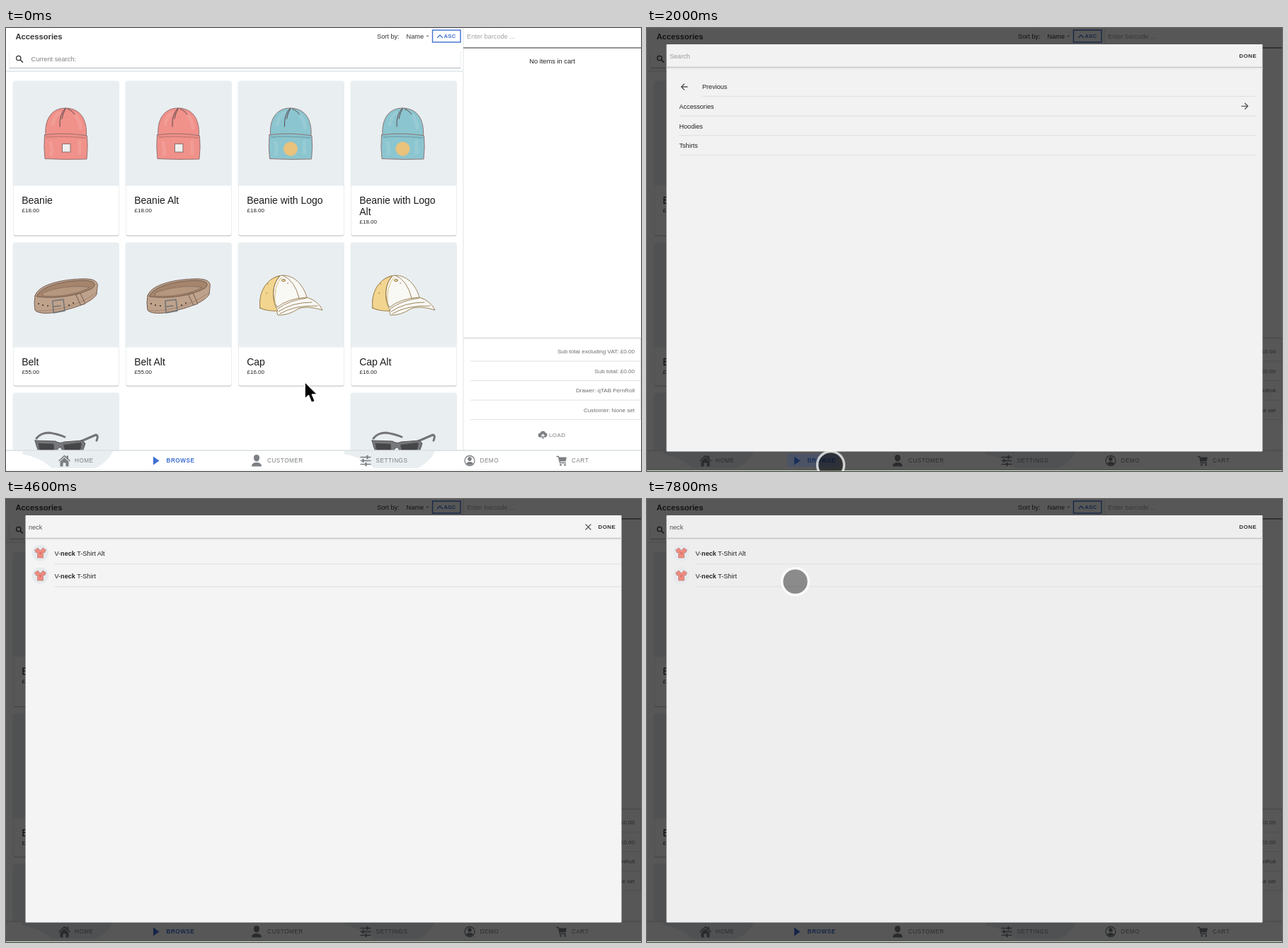
Write an HTML page that moves like this. It is 897 px wide and 625 px high and loops after 8000 ms.

```html
<!DOCTYPE html>
<html lang="en">
<head>
<meta charset="utf-8">
<title>Shop till search</title>
<style>
html, body { margin: 0; width: 100%; height: 100%; overflow: hidden; background: #fff; }
svg { display: block; width: 897px; height: 625px; font-family: "Liberation Sans", Arial, sans-serif; }
text { white-space: pre; }
.pane { fill: #e9eef1; }
.entering .pane { fill: #fff; }
.entering :is(.rule, #field, #rim) { visibility: hidden; }
.entering .far { opacity: .55; }
.ln { fill: none; stroke-linecap: round; stroke-linejoin: round; }
</style>
</head>
<body>
<svg id="stage" viewBox="0 0 897 625">
<defs>
  <g id="beanie" class="ln">
    <path stroke="#8a6a6a" stroke-width=".9" d="M56 152C54 128 65 113 84 113C104 113 115 128 113.500 152Z" style="fill:var(--c)"/>
    <path stroke="#8a6a6a" stroke-width=".9" d="M54.500 151C72 148 98 149 114.500 152Q116 168 114 185Q84 186 55 184.500Q53 168 54.500 151Z" style="fill:var(--c)"/>
    <path stroke="#fff" stroke-opacity=".1" stroke-width="5" d="M66 136Q68 125 75 120M98 123Q104 130 105 141M63 162Q66 172 64 178M104 160V176"/>
    <path stroke="#5c4a4e" stroke-width="1" d="M84 113Q75 122 76 139M84 114Q80 121 79 128M87 114Q94 117 97 122"/>
    <path stroke="#000" stroke-opacity=".14" stroke-width="1.800" d="M57 154Q84 152 112 155"/>
  </g>
  <g id="belt" class="ln" stroke="#6a564a" stroke-width=".9">
    <path fill="#bfa28b" d="M41 378C45 363 75 355 106 354C125 353 131 358 129 366L128 376C120 388 95 396 70 401C56 404 43 402 41 398Q39 388 41 378Z"/>
    <path fill="#a4846c" d="M44 377C52 363 82 357 108 356C124 356 129 361 122 367C106 376 76 383 44 379Z"/>
    <path fill="#b5967e" stroke-opacity=".5" d="M52 374C64 368 92 362 118 366C104 374 78 380 52 378Z"/>
    <path fill="#bfa28b" d="M99 376L105 374L112 389L106 391Z"/>
    <path stroke="#70757a" stroke-width="1.600" d="M66 385L81 383L83 399L67 402ZM67 393L77 392"/>
    <path stroke="#4b3c34" stroke-width="2.200" d="M46 389h.1M52 391h.1M59 392h.1M89 391h.1M95 388h.1"/>
    <path stroke-opacity=".4" d="M43 399Q90 400 127 374"/>
  </g>
  <g id="cap" class="ln" stroke="#94794a" stroke-width=".9">
    <path fill="#f8f8f5" d="M359 395C356 371 371 350 391 349C410 349 421 366 425 380Q441 385 447 398Q425 391 413 396Q398 406 384 405Q382 396 378 396Q368 400 359 395Z"/>
    <path fill="#f2d58f" d="M359 395C356 371 370 352 387 350C376 360 374 384 384 399Q369 400 359 395Z"/>
    <path d="M387 350C376 360 375 381 383 394Q397 382 424 380M391 349Q408 356 414 381M384 396Q400 384 425 381M385 400Q404 387 432 387M387 403Q407 391 440 392"/>
    <path stroke="#d8b86a" d="M389 352Q378 364 380 389"/>
    <ellipse cx="392" cy="356" rx="2.500" ry="1.700" fill="#e8cf92"/>
    <path stroke-width="1.600" d="M370 361h.1M398 360h.1M368 374h.1"/>
  </g>
  <g id="shades" class="ln" stroke="#505153">
    <path stroke-width="3" stroke="#737477" d="M43 579Q49 571 61 571Q74 573 83 577M106 583L127 574Q131 575 128 582"/>
    <path stroke-width="1" fill="#77787b" d="M41 582L70 583Q76 587 82 584L108 582L112 586Q109 596 106 601H82L78 592Q73 590 70 601H48Q43 592 41 582Z"/>
    <path stroke-width="1" fill="#454648" d="M46 586L67 587Q69 593 66 601H51Q46 594 46 586ZM82 588L106 585Q107 593 101 601H86Q81 594 82 588Z"/>
  </g>
  <g id="shirt">
    <path fill="#ee8b80" stroke="#a8655f" stroke-width=".5" d="M-3.500 -7L0 -3L3.500 -7L8 -4L6 0L4 -1V7H-4V-1L-6 0L-8 -4Z"/>
    <path fill="#d96f66" d="M-1.200 -1h2.400v3h-2.400z"/>
  </g>
</defs>
<g id="page"></g>
<rect id="dim" width="897" height="625"/>
<rect id="press" x="198" y="601" width="73" height="18.500" fill="#2a4a90" opacity=".25"/>
<rect id="edge" y="624" width="897" height="1" fill="#cfe3c8"/>
<g id="modal"></g>
<g id="pointer">
  <path id="arrow" d="M0 0V24.500L5.500 19.500L9.500 29.500L14.500 27.500L10.500 18H18Z" fill="#000" stroke="#fff" stroke-width="1.700" stroke-linejoin="round"/>
  <g id="ring">
    <circle r="17.300" fill="#000" fill-opacity=".42"/>
    <circle id="rim" r="19" fill="none" stroke="#fff" stroke-opacity=".72" stroke-width="3.400"/>
  </g>
</g>
</svg>
<script>
const $ = id => document.getElementById(id);
// y is the vertical middle of the capitals
const text = (x, y, s, size = 9.2, fill = '#333', more = '') =>
  `<text x="${x}" y="${y + size * .36}" font-size="${size}" fill="${fill}" ${more}>${s}</text>`;
const line = (x1, x2, y, color = '#dcdfe1', w = 1, cls = 'rule') =>
  `<path class="${cls}" d="M${x1} ${y}H${x2}" stroke="${color}" stroke-width="${w}"/>`;
const ink = (d, color, w = 1.3) => `<path class="ln" d="${d}" stroke="${color}" stroke-width="${w}"/>`;
const shape = (d, color) => `<path d="${d}" fill="${color}"/>`;
const END = 'text-anchor="end"', BOLD = 'font-weight="700"';
const RED = '#f0918a', TEAL = '#8bc5cf', GREY = '#7c7f83', BLUE = '#3f71d2';
const COLS = [9.5, 168.5, 327.5, 486.5];

function card(col, top, height, title, price, art, artX, color) {
  const x = COLS[col], lines = title.split('|');
  let s = `<rect x="${x + 1.2}" y="${top + 4}" width="148.600" height="${height - 2.800}" rx="2.500" fill="#c3c7c9"/>
    <rect x="${x + 1.5}" y="${top + 3}" width="148" height="${height - 3}" rx="2" fill="#fff"/>
    <path class="pane" d="M${x} ${top + 148}V${top + 4}q0 -4 4 -4h142.500q4 0 4 4V${top + 148}z"/>
    <use href="#${art}" x="${artX}" style="--c:${color}"/>`;
  lines.forEach((l, i) => s += text(x + 12.7, top + 168.5 + i * 16, l, 14, '#1b1b1b'));
  if (price) s += text(x + 13, top + 183 + (lines.length - 1) * 16, price, 8, '#222');
  return s;
}

function cards() {
  let s = '';
  ['Beanie', 'Beanie Alt', 'Beanie with Logo', 'Beanie with Logo|Alt'].forEach((title, i) => {
    const dx = [0, 159, 317.5, 476][i];
    s += card(i, 74.5, 218, title, '£18.00', 'beanie', dx, i < 2 ? RED : TEAL);
    s += i < 2
      ? `<rect x="${79.5 + dx}" y="163.500" width="11.500" height="11.500" fill="#f0efed" stroke="#85706f"/>`
      : `<circle cx="${84.5 + dx}" cy="170.500" r="10" fill="#e9c27c"/>`;
  });
  s += card(0, 302.5, 202, 'Belt', '£55.00', 'belt', 0) + card(1, 302.5, 202, 'Belt Alt', '£55.00', 'belt', 159)
    + card(2, 302.5, 202, 'Cap', '£16.00', 'cap', 0) + card(3, 302.5, 202, 'Cap Alt', '£16.00', 'cap', 159);
  return s + card(0, 514.5, 200, '', '', 'shades', 0) + card(3, 514.5, 200, '', '', 'shades', 476);
}

function header() {
  return text(13.5, 12, 'Accessories', 11.2, '#363636', BOLD)
    + text(524, 11.5, 'Sort by:') + text(565.5, 11.5, 'Name') + shape('M593 10.500h5l-2.500 2.500z', '#999')
    + `<rect x="602.500" y="3" width="39.500" height="17" fill="#fff" stroke="${BLUE}" stroke-width="1.400"/>`
    + ink('M609.500 13.500L613 10L616.500 13.500', BLUE) + text(618.5, 11.7, 'ASC', 7.7, BLUE, BOLD + ' letter-spacing=".3"')
    + line(4.5, 642.5, 56.3, '#c6c9cb', 1.3, '') + line(5, 642, 57.6, '#eceeef', 1, '')
    + ink('M4.500 34V56M642.500 34V56', '#eceeef', 1)
    + line(0, 645, 61, '#dde5e8', 1.5, '')
    + `<circle cx="17.800" cy="42.500" r="3.200" fill="none" stroke="#333" stroke-width="1.300"/>`
    + ink('M20.300 45L23.500 48.200', '#333', 1.5) + text(35.5, 44, 'Current search:', 9.2, '#808080');
}

function cart() {
  let s = ink('M646 0V596', '#e1e3e4', 1) + text(651, 12, 'Enter barcode ...', 9.2, '#a3a3a3')
    + line(646, 897, 28, '#6e7173', 1.5, '') + text(771.5, 46.5, 'No items in cart', 9.3, '#222', 'text-anchor="middle"')
    + line(646, 897, 437.5, '#d5dadd', 1.5, '') + ink('M896.500 438V552', '#e3e6e8', 1);
  ['Sub total excluding VAT: £0.00', 'Sub total: £0.00', 'Drawer: qTAB FernRoll', 'Customer: None set'].forEach((row, i) => {
    s += text(888, 456 + i * 27.6, row, 8.1, '#6c6c6c', END) + line(656, 897, 470 + i * 27.5, '#dfe2e4', 1, '');
  });
  return s + shape('M755 577.500a3 3 0 0 1 -.5 -6a4 4 0 0 1 7.500 -.5a3.300 3.300 0 0 1 -.2 6.500h-1.800v-2h1.500l-3 -3l-3 3h1.500v2zM757.500 575.500h2v4h-2z', GREY)
    + text(767, 574, 'LOAD', 8, GREY, 'letter-spacing=".4"');
}

function nav() {
  const label = (x, s, color = GREY, more = '') => text(x, 610.5, s, 8.2, color, 'letter-spacing=".5" ' + more);
  // cards tint the bar slightly where they pass below it
  const tint = x => `<path class="pane" d="M${x} 597H${x + 128}Q${x + 122} 611 ${x + 104} 621H${x + 42}Q${x + 26} 606 ${x} 601Z"/>`;
  return `<rect y="596" width="897" height="29" fill="#fff"/>` + tint(23) + tint(478)
    + line(0, 897, 596, '#d9dee1', 1.3, '') + line(0, 897, 623.5, '#eef0f0', 1, '')
    + shape('M74 610.500L82.500 602.500L85.500 605.300V603.500H88V607.600L91 610.500L90 611.600L82.500 604.800L75 611.600ZM76.500 611.500L82.500 606L88.500 611.500V618.500H84.500V613.500H80.500V618.500H76.500Z', GREY)
    + label(97, 'HOME')
    + shape('M208 604.500L216.500 610.500L208 616.500Z', BLUE) + label(226.5, 'BROWSE', BLUE, BOLD)
    + shape('M350 606a4 4 0 0 1 8 0v1a4 4.500 0 0 1 -8 0zM347 618.500q0 -5.500 7 -5.500t7 5.500z', GREY) + label(369, 'CUSTOMER')
    + ink('M501 605.500H515M501 610.500H515M501 615.500H515', GREY, 1.3)
    + ink('M510.500 604V607M504.500 609V612M508.500 614V617', GREY, 2.4) + label(522.5, 'SETTINGS')
    + `<circle cx="655" cy="610.500" r="7" fill="none" stroke="${GREY}" stroke-width="1.300"/>`
    + shape('M652.200 608a2.800 2.800 0 1 1 5.600 0a2.800 3 0 0 1 -5.600 0zM650 615q1 -3 5 -3t5 3q-5 3.500 -10 0z', GREY) + label(669.5, 'DEMO')
    + ink('M778 604.500H780.500L782.500 613.500H790.500', GREY) + shape('M780.500 605.500H792L790.500 611.500H782z', GREY)
    + ink('M783.500 616.400h.1M789.500 616.400h.1', GREY, 2.6) + label(799, 'CART');
}

function dialog() {
  const dark = '#222';
  let list = ink('M57 83H49M52.500 79L48.500 83L52.500 87', '#555') + text(78, 83, 'Previous', 9.1, dark) + line(78, 860, 96.3)
    + `<g class="far">${ink('M840 110.300H848.500M844.800 106.300L848.800 110.300L844.800 114.300', '#555')}</g>`;
  ['Accessories', 'Hoodies', 'Tshirts'].forEach((s, i) =>
    list += text(45.5, 111 + i * 27.5, s, 9.1, dark) + line(45.5, 860, 124.2 + i * 27.5));
  let found = '';
  [' Alt', ''].forEach((s, i) => {
    const y = 76 + i * 32;
    found += `<circle cx="48.500" cy="${y}" r="11.600" fill="#e6eaed"/><use href="#shirt" x="48.500" y="${y}"/>`
      + text(68.5, y + .8, `V-<tspan ${BOLD}>neck</tspan> T-Shirt${s}`, 9.1, dark) + line(68.5, 869, y + 15.8);
  });
  return `<rect id="sheet" x="27.500" y="23" width="842" height="574.500" rx="1"/>`
    + line(27.5, 869.5, 55.5, '#c3c3c3', 1.5) + line(27.5, 869.5, 57, '#e6e6e6')
    + text(32, 39.5, '', 9.1, '#999', 'id="field"')
    + `<path id="caret" d="M52 34.500V44.500" stroke="#444"/>`
    + `<g id="clear">${ink('M819 36L826 43M826 36L819 43', '#555', 1.2)}</g>`
    + text(836.5, 39.5, 'DONE', 7.9, '#333', BOLD + ' letter-spacing=".5" class="far"')
    + `<g id="list">${list}</g><g id="found">${found}</g>`;
}

$('page').innerHTML = cards() + header() + cart() + nav();
$('modal').innerHTML = dialog();

const LOOP = 8000, STEP = 200;
const PATH = [[0, 422, 499], [200, 410, 530], [400, 410, 530], [1200, 259, 616], [2000, 259.5, 616.5], [2800, 302, 40],
  [3000, 306, 6], [3400, 295.5, 56.5], [6400, 293, 56], [7400, 209.5, 116.5], [8000, 209.5, 116.5]];
const TYPED = [[0, ''], [4200, 'n'], [4400, 'nec'], [4600, 'neck']];
const CARET = [[0, 0], [4000, 1], [4600, 0], [5200, 1], [5600, 0], [6000, 1], [6600, 0], [7000, 1], [7400, 0]];
const SHEET = [[0, '#d2d4d5'], [2000, '#f2f2f2'], [2200, '#f4f4f4'], [7800, '#eee']];

const held = (table, t) => table.findLast(k => k[0] <= t)[1];
const during = (t, a, b) => t >= a && t < b;
const show = (id, on) => $(id).style.display = on ? '' : 'none';

function place(t) {
  const i = PATH.findIndex(k => k[0] > t);
  const [t0, x0, y0] = PATH[i - 1], [t1, x1, y1] = PATH[i];
  const p = (t - t0) / (t1 - t0);
  return [x0 + (x1 - x0) * p, y0 + (y1 - y0) * p];
}

function draw(time) {
  const t = Math.floor(time % LOOP / STEP) * STEP;
  const open = t >= 1800, entering = during(t, 1800, 2000);
  const typed = held(TYPED, t);

  $('stage').classList.toggle('entering', entering);
  $('dim').setAttribute('opacity', !open ? 0 : entering ? .175 : .66);
  show('press', during(t, 2000, 2200));
  show('edge', t >= 2000);

  show('modal', open);
  $('modal').setAttribute('opacity', entering ? .33 : 1);
  $('modal').setAttribute('transform', `translate(0 ${entering ? 17 : 0})`);
  $('sheet').setAttribute('fill', held(SHEET, t));
  $('field').textContent = typed || 'Search';
  $('field').setAttribute('fill', typed ? '#555' : '#999');
  show('caret', held(CARET, t));
  $('caret').setAttribute('transform', `translate(${typed.length * 5 - 20} 0)`);
  show('clear', during(t, 4200, 7800));
  show('list', t < 4200);
  show('found', t >= 4600);

  const pressed = during(t, 1400, 2200) || during(t, 3600, 4000) || t >= 7800;
  show('pointer', !during(t, 4200, 6600));
  show('ring', pressed);
  show('arrow', !pressed);
  $('pointer').setAttribute('transform', `translate(${place(t)})`);
}

const start = performance.now();
function tick(now) {
  draw(Math.max(0, now - start));
  requestAnimationFrame(tick);
}
draw(0);
requestAnimationFrame(tick);
</script>
</body>
</html>
```
